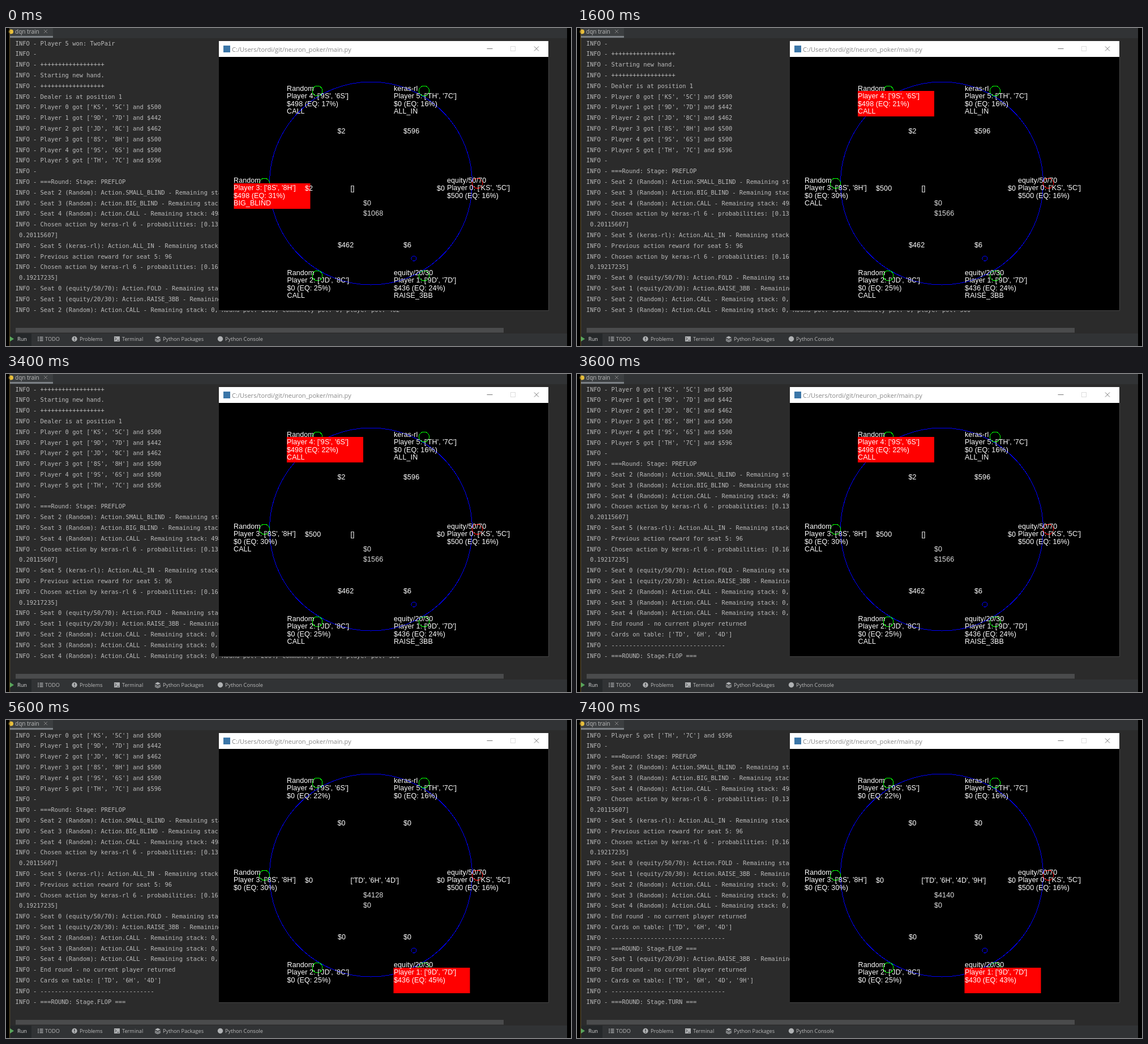
Recreate the animation shown at these times as an HTML page. Size 998x561 px, loop 8 s.

```html
<!DOCTYPE html>
<html lang="en">
<head>
<meta charset="utf-8">
<title>Poker training</title>
<style>
html, body { margin: 0; width: 100%; height: 100%; overflow: hidden; background: #000; }
svg { display: block; }
text { white-space: pre; }
#log { font: 10.44px "DejaVu Sans Mono", monospace; fill: #bbb; }
#board { font: 12.5px "Liberation Sans", Arial, sans-serif; letter-spacing: .1px; fill: #fff; }
.ui { font: 9.2px "Open Sans", sans-serif; fill: #bbb; }
.ring { fill: none; shape-rendering: crispEdges; }
</style>
</head>
<body>
<svg width="998" height="561" viewBox="0 0 998 561">
  <rect x="6" width="985" height="561" fill="#2b2b2b"/>
  <rect x="7" width="984" height="18" fill="#313335"/>
  <rect x="7" width="76" height="18" fill="#3c3f41"/>
  <rect x="7" y="14" width="76" height="3" fill="#7b8085"/>
  <circle cx="9" cy="6.5" r="4" fill="#e8bf3c"/>
  <text class="ui" x="16" y="10" style="font-size:10px">dqn train</text>
  <path d="M67 3l6 6m0-6l-6 6" stroke="#808080"/>
  <rect x="17" y="529" width="862" height="8.5" fill="#4a4b4c"/>
  <rect x="7" y="539" width="984" height="22" fill="#313335"/>
  <rect x="7" y="539" width="38" height="22" fill="#25282a"/>
  <rect x="6" width="1" height="561" fill="#6b5629"/>

  <g class="ui">
    <path d="M7 544l7 4.5-7 4.5z" fill="#57a55c"/>
    <path d="M56 545.5h2m1.5 0h6m-9.5 3h2m1.5 0h6m-9.5 3h2m1.5 0h6" stroke="#afb1b3" stroke-width="1.4"/>
    <circle cx="121" cy="548.5" r="4.7" fill="#afb1b3"/>
    <path d="M121 545.5v3.5m0 1v1.5" stroke="#313335" stroke-width="1.4"/>
    <rect x="191" y="544" width="10" height="9" fill="#afb1b3"/>
    <path d="M192.5 546l2.5 2.3-2.5 2.3m4 .4h3" fill="none" stroke="#313335"/>
    <path d="M268 543.5l5 2.5-5 2.5-5-2.5z" fill="#afb1b3"/>
    <path d="M263 548.7l5 2.3 5-2.3m-10 2.5l5 2.3 5-2.3" fill="none" stroke="#afb1b3" stroke-width="1.3"/>
    <circle cx="378.5" cy="548.5" r="4.7" fill="#afb1b3"/>
    <text x="20" y="552" style="fill:#ddd">Run</text>
    <text x="69" y="552">TODO</text>
    <text x="130" y="552">Problems</text>
    <text x="205" y="552">Terminal</text>
    <text x="277" y="552">Python Packages</text>
    <text x="387" y="552">Python Console</text>
  </g>

  <g id="log"></g>

  <rect x="376" y="23" width="582" height="475"/>
  <rect x="376" y="23" width="582" height="28" fill="#fff"/>
  <path d="M958.5 51V498.5H376" fill="none" stroke="#444"/>
  <rect x="384" y="31" width="12" height="12" fill="#3b76a8"/>
  <text class="ui" x="399" y="42" style="font-size:11.1px;fill:#888">C:/Users/tordi/git/neuron_poker/main.py</text>
  <path d="M849.5 36.5h10m73.5-4l8 8m0-8l-8 8" stroke="#777"/>
  <rect x="891.5" y="32.5" width="8" height="8" fill="none" stroke="#ddd"/>

  <g id="board"></g>
</svg>
<script>
const LOOP = 8000, ROWS = 26;
const $ = id => document.getElementById(id);
const text = (x, y, s, attrs = "") => `<text x="${x}" y="${y}" ${attrs}>${s}</text>`;
const ring = (x, y, r, color) => `<circle class="ring" cx="${x}" cy="${y}" r="${r}" stroke="${color}"/>`;

// name, cards, label x/y, marker x/y, pot x/y
const seats = [
  ["equity/50/70", "'KS', '5C'", 779, 273, 832.5, 274, 761, 286.5],
  ["equity/20/30", "'9D', '7D'", 685, 436, 738.5, 437, 702, 387],
  ["Random", "'JD', '8C'", 496.5, 436, 550, 437, 586, 387],
  ["Random", "'8S', '8H'", 402, 273, 456.5, 274, 528, 287],
  ["Random", "'9S', '6S'", 496, 111, 550, 111, 585.5, 186],
  ["keras-rl", "'TH', '7C'", 685, 111, 738.5, 111, 702, 186]
];

const seat = (n, action, rest = "") =>
  `Seat ${n} (${seats[n][0]}): Action.${action} - Remaining stack: ${rest}`;
const call = (n, round, pot) =>
  seat(n, "CALL", `0, Round pot: ${round}, Community pot: 0, player pot: ${pot}`);
const dealt = [500, 442, 462, 500, 500, 596];
const plus = "+".repeat(18), dash = "-".repeat(32);
const endRound = "End round - no current player returned";

const log = [
  "Player 5 won: TwoPair", "", plus, "Starting new hand.", plus,
  "Dealer is at position 1",
  ...seats.map((s, i) => `Player ${i} got [${s[1]}] and $${dealt[i]}`),
  "", "===Round: Stage: PREFLOP",
  seat(2, "SMALL_BLIND"), seat(3, "BIG_BLIND"), seat(4, "CALL", "498"),
  "Chosen action by keras-rl 6 - probabilities: [0.13", " 0.20115607]",
  seat(5, "ALL_IN"), "Previous action reward for seat 5: 96",
  "Chosen action by keras-rl 6 - probabilities: [0.16", " 0.19217235]",
  seat(0, "FOLD"), seat(1, "RAISE_3BB"),
  call(2, 1068, 462), call(3, 1566, 500), call(4, 2064, 500),
  endRound, "Cards on table: ['TD', '6H', '4D']", dash, "===ROUND: Stage.FLOP ===",
  seat(1, "RAISE_3BB"),
  endRound, "Cards on table: ['TD', '6H', '4D', '9H']", dash, "===ROUND: Stage.TURN ==="
].map(s => s[0] === " " ? s : "INFO - " + s);

const start = () => ({
  end: ROWS, active: 3, table: "", community: 0, round: 1068,
  stack: [500, 436, 0, 498, 498, 0],
  eq: [16, 24, 25, 31, 17, 16],
  action: ["", "RAISE_3BB", "CALL", "BIG_BLIND", "CALL", "ALL_IN"],
  pot: [0, 6, 462, 2, 2, 596]
});

const steps = [
  [600, s => s.eq[3] = 30],
  [1000, s => s.end = 27],
  [1600, s => {
    s.active = 4; s.round = 1566; s.eq[4] = 21;
    s.stack[3] = 0; s.action[3] = "CALL"; s.pot[3] = 500;
  }],
  [3200, s => s.eq[4] = 22],
  [3400, s => s.end = 28],
  [3600, s => s.end = 32],
  [5000, s => {
    s.active = 1; s.round = 0; s.community = 4128; s.table = "'TD', '6H', '4D'";
    s.stack[4] = 0; s.eq[1] = 45; s.action.fill(""); s.pot.fill(0);
  }],
  [6200, s => s.end = 37],
  [7400, s => {
    s.community = 4140; s.table += ", '9H'"; s.stack[1] = 430; s.eq[1] = 43;
  }]
];

function drawLog(s) {
  return log.slice(s.end - ROWS, s.end).map((l, i) => text(16.6, 30.6 + i * 18.8, l)).join("");
}

function drawBoard(s) {
  const [, , , , mx, my] = seats[s.active];
  let out = ring(644.5, 274, 179, "#00f") + ring(720.5, 406.5, 4.5, "#00f");
  seats.forEach((p, i) => out += ring(p[4], p[5], 9, i ? "#0f0" : "#f00"));
  out += `<rect x="${mx - 54}" y="${my}" width="135" height="45" fill="#f00"/>`;
  seats.forEach(([name, cards, x, y, , , px, py], i) => {
    const lines = [name, `Player ${i}: [${cards}]`, `$${s.stack[i]} (EQ: ${s.eq[i]}%)`, s.action[i]];
    lines.forEach((l, k) => out += text(x, y + k * 13.4, l));
    out += text(px, py, "$" + s.pot[i]);
  });
  return out + text(608.5, 286.5, `[${s.table}]`) +
    text(631, 313, "$" + s.community, 'fill="#ddd"') +
    text(631, 331, "$" + s.round, 'fill="#ddd"');
}

let shown = -1;
function frame() {
  const t = performance.now() % LOOP;
  const done = steps.filter(([at]) => at <= t);
  if (done.length !== shown) {
    shown = done.length;
    const s = start();
    done.forEach(([, apply]) => apply(s));
    $("log").innerHTML = drawLog(s);
    $("board").innerHTML = drawBoard(s);
  }
  requestAnimationFrame(frame);
}
frame();
</script>
</body>
</html>
```
